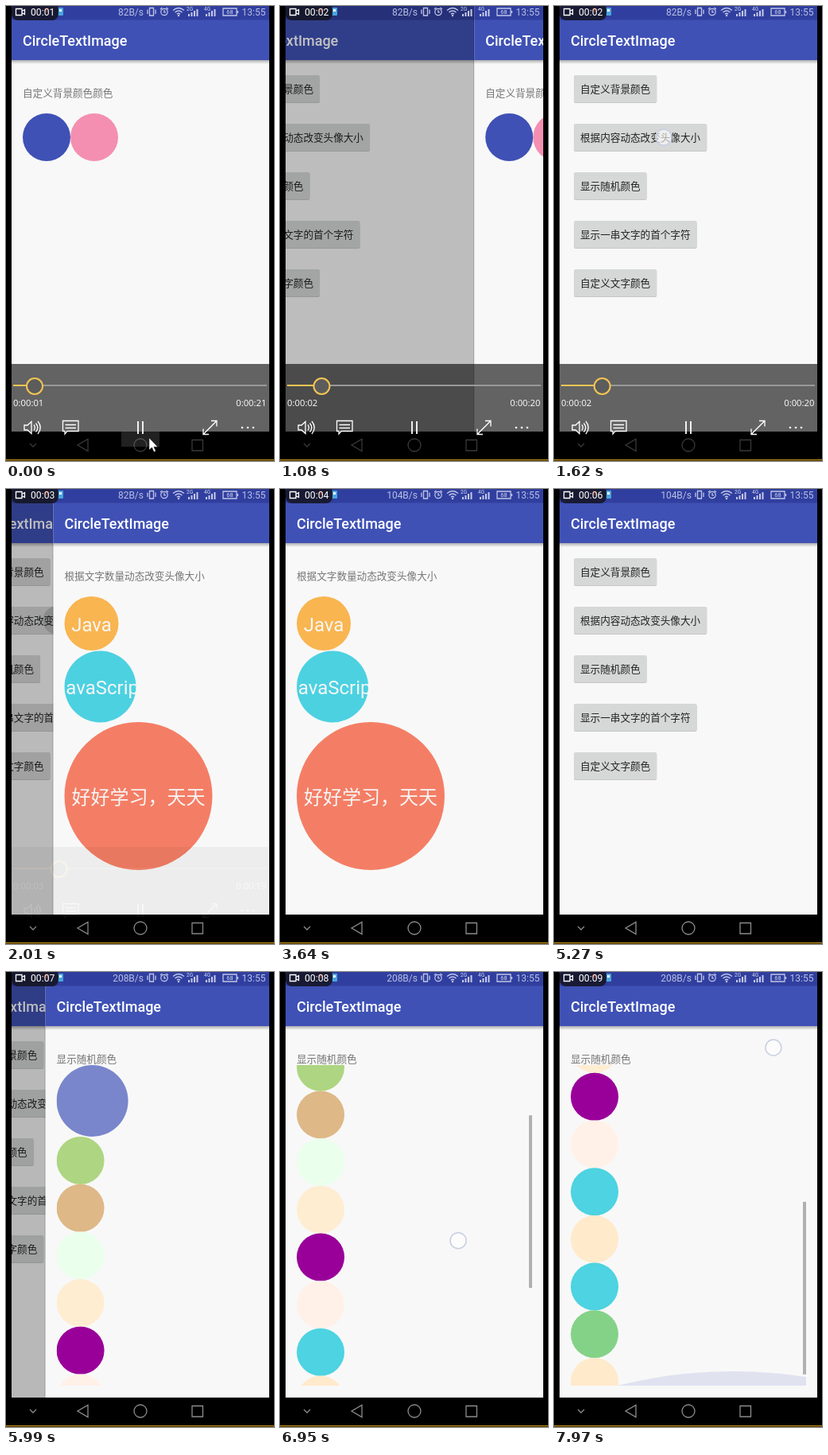
An HTML page for the animation above (8000 ms loop, 337x572 px).

```html
<!DOCTYPE html>
<html lang="zh">
<head>
<meta charset="utf-8">
<title>CircleTextImage</title>
<style>
html, body { margin: 0; width: 100%; height: 100%; overflow: hidden; background: #000; }
svg { display: block; width: 337px; height: 572px; }
text { font-family: Roboto, "Noto Sans CJK SC", "Noto Sans CJK", sans-serif; white-space: pre; }
.title { font-size: 18px; font-weight: 500; fill: #fff; }
.hint { font-size: 12.6px; fill: #757575; }
.label { font-size: 12.6px; fill: #222; }
.avatar { font-size: 24px; fill: #f6f6f6; text-anchor: middle; }
.status { font-size: 12px; fill: #b9bfe3; }
.tiny { font-size: 6.5px; fill: #d5d9f0; }
.time { font: 11.3px "Open Sans", sans-serif; fill: #fff; }
.line { fill: none; stroke-width: 1.3; }
</style>
</head>
<body>
<svg id="stage" viewBox="0 0 337 572" xmlns="http://www.w3.org/2000/svg"></svg>
<script>
const LOOP = 8000, W = 324, SLIDE = 400;
const ROW = 59.7, LIST_TOP = 117, LIST_H = 403, CONTENT_H = 748;

const rect = (x, y, w, h, fill, more = '') =>
  `<rect x="${x}" y="${y}" width="${w}" height="${h}" fill="${fill}" ${more}/>`;
const circle = (x, y, r, fill, more = '') =>
  `<circle cx="${x}" cy="${y}" r="${r}" fill="${fill}" ${more}/>`;
const text = (x, y, cls, str, more = '') =>
  `<text x="${x}" y="${y}" class="${cls}" ${more}>${str}</text>`;
const path = (d, stroke, more = '') =>
  `<path d="${d}" class="line" stroke="${stroke}" ${more}/>`;
const group = (id, body, more = '') => `<g id="${id}" ${more}>${body}</g>`;
const clip = (id, x, y, w, h) => `<clipPath id="${id}">${rect(x, y, w, h, '#000')}</clipPath>`;

// An app screen, in its own coordinates
const screen = body =>
  rect(-1, 0, 1, 535, 'rgba(0,0,0,.18)') + rect(0, 0, W, 535, '#f8f8f8') + body +
  rect(0, 68, W, 5, 'url(#shade)') + rect(0, 17, W, 51, '#3f51b5') +
  rect(0, 0, W, 17.5, '#303f9f') + text(14, 50, 'title', 'CircleTextImage');

const button = (str, i) => {
  const y = 87 + i * 61, w = str.length * 12.6 + 16;
  return rect(18, y + 1, w, 34, 'rgba(0,0,0,.2)', 'rx="2"') +
    rect(18, y, w, 34, '#d6d7d7', 'rx="2"') + text(26, y + 21.5, 'label', str);
};

const menu = screen(['自定义背景颜色', '根据内容动态改变头像大小', '显示随机颜色',
  '显示一串文字的首个字符', '自定义文字颜色'].map(button).join('') +
  circle(131, 165, 18, 'rgba(0,0,0,.14)', 'id="ripple"'));

const avatar = (y, r, fill, str, base, id) =>
  circle(14 + r, y, r, fill) + clip(id, 14, y - r, 2 * r, 2 * r) +
  `<g clip-path="url(#${id})">${text(14 + r, base, 'avatar', str)}</g>`;

const colours = ['#aed581', '#deb887', '#eaffec', '#ffedd2', '#990099', '#fff1e8',
  '#4dd3e1', '#ffeacc', '#4dd3e1', '#84d288', '#ffeacb'];
const list = circle(59, 162, 45, '#7986cb') +
  colours.map((c, i) => circle(44, 237 + i * ROW, 30, c)).join('');

const pages = [
  text(14, 114, 'hint', '自定义背景颜色颜色') +
    circle(44, 165, 30, '#3f51b5') + circle(104, 165, 30, '#f48fb1'),
  text(14, 114, 'hint', '根据文字数量动态改变头像大小') +
    avatar(169, 34, '#f9b550', 'Java', 179, 'c1') +
    avatar(248.5, 45, '#4cd1e1', 'JavaScript', 258, 'c2') +
    avatar(386, 93, '#f47e65', '好好学习，天天', 395.5, 'c3'),
  text(14, 114, 'hint', '显示随机颜色') +
    `<g clip-path="url(#list)">${group('rows', list)}` +
    circle(218, 1095, 593, 'rgba(63,81,181,.13)', 'id="glow"') + '</g>' +
    rect(306, 0, 4, 217, '#b0b0b0', 'id="bar"')
].map((body, i) => group('page' + i, screen(body))).join('');

const signal = (x, label) => text(x - 1, 5.5, 'tiny', label) +
  [0, 1, 2, 3].map(i => rect(x + 1 + i * 3.5, 9 - i * 2 + 1, 2, 3 + i * 2, '#c5caea')).join('');

const ink = '#c0c6e8';
const statusBar =
  rect(65, 2, 7, 10, '#4aa5dd', 'rx="1"') + rect(67, 4, 3, 3, '#fff') +
  rect(7, -4, 59, 22, 'rgba(20,20,32,.85)', 'rx="8"') +
  circle(51, 5, 3, 'rgba(210,80,40,.35)') +
  path('M12.5 3.5h7.5v8h-7.5zM20 6.5l3.5-2v6l-3.5-2z', '#fff') +
  text(31, 12, 'status', '', 'id="clock" style="fill:#fff;font-size:12.2px"') +
  text(173, 11.5, 'status', '', 'id="speed" text-anchor="end"') +
  path('M180.5 2.5h5v9.500h-5zM178 4.500v5.500M188 4.500v5.500', ink) +
  circle(199, 7.5, 4.2, 'none', `stroke="${ink}" stroke-width="1.2"`) +
  path('M199 5v2.800h2M194 4l2.500-2M204 4l-2.500-2', ink) +
  path('M210 5.500q7-6 14 0M212.500 8q4.500-4 9 0M215 10.300q2-2 4 0', ink) +
  circle(217, 12, 1.2, ink) + signal(228, '2G') + signal(250, '4G') +
  path('M273 3h17v9h-17zM291.500 6v3', ink) +
  text(281.5, 10.3, 'tiny', '68', 'text-anchor="middle" style="font-size:7.5px"') +
  text(296.5, 11.5, 'status', '13:55');

const navBar = rect(0, 535, 337, 37, '#000') +
  group('back', rect(61, 535, 72, 35, '#222', 'rx="17"') + circle(108, 558, 10, '#484848')) +
  path('M30 550l4 4 4-4', '#8c8c8c') + path('M103 544.500v15l-13-7.500z', '#8c8c8c') +
  circle(169, 552, 8, 'none', 'stroke="#8c8c8c" stroke-width="1.3"') +
  path('M234 545.500h13.500v13.500h-13.500z', '#8c8c8c');

const gold = '#f4c553';
const player = rect(7, 450, W, 120, 'rgba(0,0,0,.6)') +
  rect(9, 476, 319, 2, '#999') + rect(9, 476, 20, 2, gold, 'id="played"') +
  circle(36, 478, 10, '#5c5c5c', `id="thumb" stroke="${gold}" stroke-width="2"`) +
  text(9, 502.5, 'time', '', 'id="elapsed"') +
  text(327.5, 502.5, 'time', '', 'id="left" text-anchor="end"') +
  path('M23 527h4l5-4.500v15l-5-4.500h-4zM35 526.500q2.500 3.500 0 7M37.500 524.500q4.500 5.500 0 11M40 522q6.500 8 0 16', '#fff') +
  path('M71.500 521.500h19.500v13h-14l-3 3.500v-3.500h-2.500zM74.500 526.500h13.500M74.500 530.500h13.500', '#fff') +
  path('M166 522v16M172 522v16', '#fff', 'style="stroke-width:1.8"') +
  path('M248 538.500l17-17M258 521.500h7v7M248 531.500v7h7', '#fff') +
  [297, 304, 311].map(x => circle(x, 530, 1.3, '#fff')).join('') +
  group('mouse', rect(145, 535, 48, 19, 'rgba(255,255,255,.13)') +
    '<path d="M180 543v15l3.500-3 2.500 5.500 2.300-1-2.400-5.300h4.800z" fill="#fff" stroke="#222" stroke-width=".5"/>');

const stage = document.getElementById('stage');
stage.innerHTML =
  `<defs><linearGradient id="shade" x1="0" y1="0" x2="0" y2="1">
    <stop offset="0" stop-color="#000" stop-opacity=".3"/>
    <stop offset="1" stop-color="#000" stop-opacity="0"/></linearGradient>
    ${clip('phone', 7, 0, W, 535)}${clip('list', 14, LIST_TOP, 296, LIST_H)}</defs>` +
  rect(0, 0, 337, 572, '#000') +
  `<g clip-path="url(#phone)">${group('menu', menu)}${rect(7, 0, W, 535, '#000', 'id="dim"')}${pages}</g>` +
  navBar + statusBar +
  circle(0, 0, 10, 'rgba(255,255,255,.6)', 'id="touch" stroke="#c9cfe2" stroke-width="1.5"') +
  group('player', player) + rect(0, 570, 337, 1.3, '#c99416');

const el = {};
stage.querySelectorAll('[id]').forEach(e => el[e.id] = e);

const clamp = v => Math.max(0, Math.min(1, v));
const ease = v => 1 - (1 - clamp(v)) ** 2;
const between = (t, a, b) => t >= a && t < b;
const show = (e, on) => e.style.display = on ? '' : 'none';
const set = (e, attrs) => { for (const k in attrs) e.setAttribute(k, attrs[k]); };
const move = (e, x, y = 0) => set(e, { transform: `translate(${x} ${y})` });

function track(keys, t) {
  if (t <= keys[0][0]) return keys[0][1];
  for (let i = 1; i < keys.length; i++) {
    const [a, va] = keys[i - 1], [b, vb] = keys[i];
    if (t < b) return va + (vb - va) * (t - a) / (b - a);
  }
  return keys[keys.length - 1][1];
}

const visits = [[-SLIDE, 888], [1772, 4844], [5736, LOOP + SLIDE]];
const ticks = [900, 1900, 2960, 3900, 4860, 5900, 6900, 7900];
const scrollKeys = [[6750, 0], [6950, 117], [7300, 225], [7970, 319]];

function drawPages(t) {
  let shift = 0, dim = 0;
  visits.forEach(([enter, leave], i) => {
    const on = between(t, enter, leave + SLIDE);
    show(el['page' + i], on);
    if (!on) return;
    const closing = t >= leave;
    const p = ease((t - (closing ? leave : enter)) / SLIDE);
    move(el['page' + i], 7 + W * (closing ? p : 1 - p));
    shift = closing ? -153 * Math.sqrt(1 - p) : -125 * p ** 3;
    dim = closing ? .46 * Math.sqrt(1 - p) : .3 * p;
  });
  move(el.menu, 7 + shift);
  set(el.dim, { opacity: dim });
  show(el.ripple, between(t, 1650, 2150));
}

function drawList(t) {
  const s = track(scrollKeys, t);
  move(el.rows, 0, -s);
  set(el.bar, { y: LIST_TOP + s * LIST_H / CONTENT_H });
  show(el.bar, t > 6720);
  set(el.glow, { opacity: clamp((t - 7850) / 110) });
  return s;
}

function drawTouch(t, s) {
  let at = null;
  if (between(t, 1620, 1772)) at = [138, 165];
  else if (between(t, 5590, 5736)) at = [75, 226];
  else if (t > 6720) at = [224 + (s - 117) * .257, 338 - (s - 117) * 1.203];
  show(el.touch, at);
  if (at) set(el.touch, { cx: at[0], cy: at[1] });
  show(el.back, between(t, 760, 1020) || between(t, 4640, 5060));
}

function drawPlayer(t) {
  const x = 36 + t * .0152, sec = 1 + (t >= 900) + (t >= 1900);
  show(el.player, t < 2030);
  set(el.player, { opacity: 1 - clamp((t - 1760) / 270) });
  set(el.played, { width: x - 19 });
  set(el.thumb, { cx: x });
  el.elapsed.textContent = '0:00:0' + sec;
  el.left.textContent = '0:00:' + (22 - sec);
  show(el.mouse, t < 270);
}

function draw(now) {
  const t = now % LOOP;
  drawPages(t);
  drawTouch(t, drawList(t));
  drawPlayer(t);
  el.clock.textContent = '00:0' + (1 + ticks.filter(k => t >= k).length);
  el.speed.textContent = (t < 3110 ? 82 : t < 5540 ? 104 : 208) + 'B/s';
}

const start = performance.now();
function frame() {
  draw(performance.now() - start);
  requestAnimationFrame(frame);
}
frame();
</script>
</body>
</html>
```
